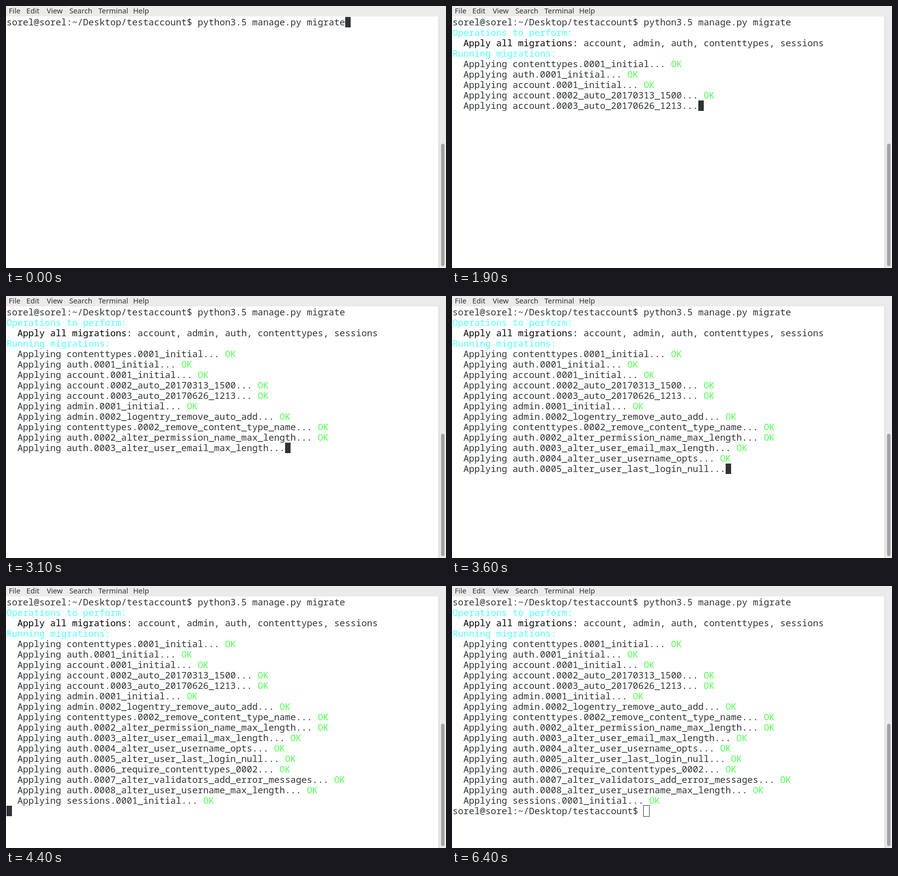
Recreate the animation shown at these times as an HTML page. Size 886 by 527 pixels, loop 6.6 s.

```html
<!DOCTYPE html>
<html lang="en">
<head>
<meta charset="utf-8">
<title>Terminal migration</title>
<style>
  html, body { margin: 0; width: 100%; height: 100%; overflow: hidden; background: #fff; }
  body { position: relative; color: #2e3436; }
  div, span.item { position: absolute; }
  #menu { left: 0; top: 0; width: 100%; height: 21px; background: #ebebeb; }
  .item { top: -1px; font: 14.67px/20px "Noto Sans", "Open Sans", sans-serif; }
  #track { left: 871px; top: 21px; width: 14px; height: 506px; background: #ebebeb; border-left: 1px solid #cbcbcb; }
  #thumb { left: 876px; top: 277px; width: 7px; height: 246px; border-radius: 3.5px; background: #a3a3a3; }
  .row { left: 1px; white-space: pre; font: 18.333px/21px "Noto Sans Mono", "DejaVu Sans Mono", monospace; }
  .head { color: #54ffff; }
  .ok { color: #54ff54; }
  b { color: #000; font-weight: 500; }
  #cursor { width: 11px; height: 21px; background: #2e3436; }
  #cursor.hollow { margin: -1px; background: none; border: 1px solid #2e3436; }
</style>
</head>
<body>
<div id="menu"></div>
<div id="track"></div>
<div id="thumb"></div>
<div id="cursor"></div>
<script>
const LOOP = 6600, CELL = 11, LINE = 21, TOP = 22;
const ENTER = 200, OUTPUT = 1100, DONE = 4400, PROMPT = 5600, BLUR = 6400;
const prompt = 'sorel@sorel:~/Desktop/testaccount$ ';
const command = prompt + 'python3.5 manage.py migrate';

const migrations = [
  [OUTPUT, 'contenttypes.0001_initial'],
  [1200, 'auth.0001_initial'],
  [1500, 'account.0001_initial'],
  [1700, 'account.0002_auto_20170313_1500'],
  [1900, 'account.0003_auto_20170626_1213'],
  [2200, 'admin.0001_initial'],
  [2400, 'admin.0002_logentry_remove_auto_add'],
  [2700, 'contenttypes.0002_remove_content_type_name'],
  [2900, 'auth.0002_alter_permission_name_max_length'],
  [3100, 'auth.0003_alter_user_email_max_length'],
  [3400, 'auth.0004_alter_user_username_opts'],
  [3600, 'auth.0005_alter_user_last_login_null'],
  [3800, 'auth.0006_require_contenttypes_0002'],
  [3800, 'auth.0007_alter_validators_add_error_messages'],
  [4000, 'auth.0008_alter_user_username_max_length'],
  [4200, 'sessions.0001_initial']
];

const menuItems = [['File', 5.5], ['Edit', 41], ['View', 82], ['Search', 127.5], ['Terminal', 186], ['Help', 256]];
const menu = document.getElementById('menu');
const cursor = document.getElementById('cursor');
const timed = [];

for (const [label, x] of menuItems) {
  const item = document.createElement('span');
  item.className = 'item';
  item.textContent = label;
  item.style.left = x + 'px';
  menu.append(item);
}

function addRow(line, at, html) {
  const el = document.createElement('div');
  el.className = 'row';
  el.style.top = TOP - 1 + line * LINE + 'px';
  el.innerHTML = html;
  document.body.append(el);
  timed.push({ el, at });
  return el;
}

// Cursor stops: time, line, column
const stops = [[0, 0, command.length], [ENTER, 1, 0]];

addRow(0, 0, command);
addRow(1, OUTPUT, '<span class="head">Operations to perform:</span>');
addRow(2, OUTPUT, '  <b>Apply all migrations:</b> account, admin, auth, contenttypes, sessions');
addRow(3, OUTPUT, '<span class="head">Running migrations:</span>');
migrations.forEach(([at, name], i) => {
  const text = `  Applying ${name}...`;
  const row = addRow(4 + i, at, text + '<span class="ok"> OK</span>');
  const next = migrations[i + 1];
  timed.push({ el: row.lastChild, at: next ? next[0] : DONE });
  stops.push([at, 4 + i, text.length]);
});

const lastLine = 4 + migrations.length;
addRow(lastLine, PROMPT, prompt);
stops.push([DONE, lastLine, 0], [PROMPT, lastLine, prompt.length]);

function draw() {
  const t = performance.now() % LOOP;
  for (const { el, at } of timed) el.style.display = t >= at ? '' : 'none';
  const [, line, column] = stops.filter(stop => stop[0] <= t).pop();
  cursor.style.left = 1 + column * CELL + 'px';
  cursor.style.top = TOP + line * LINE + 'px';
  cursor.className = t >= BLUR ? 'hollow' : '';
  requestAnimationFrame(draw);
}
draw();
</script>
</body>
</html>
```
